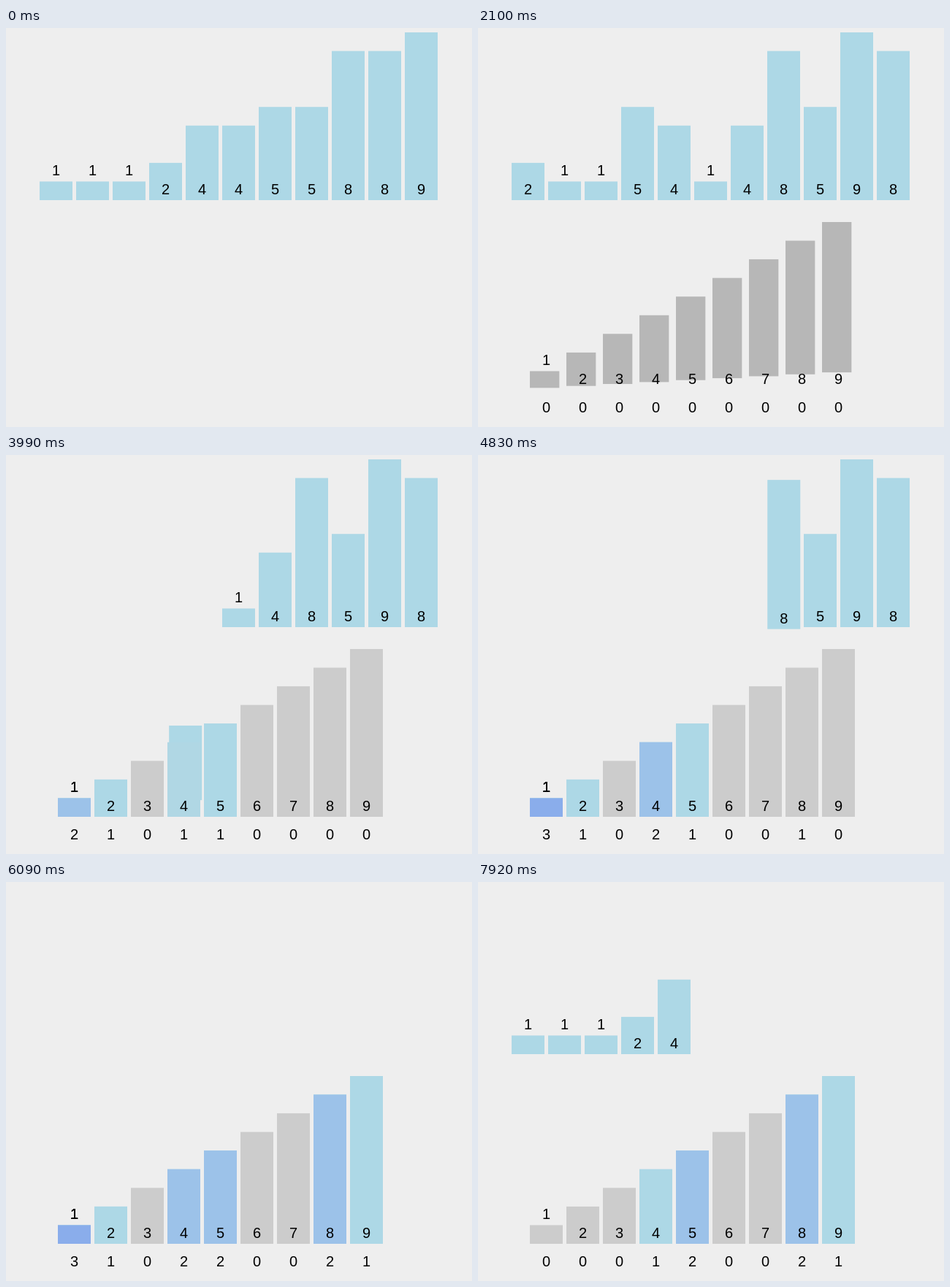
These frames come from a looping animation (638 px wide and 547 px high, 8 s). An HTML page with a canvas:

```html
<!DOCTYPE html>
<html lang="en">
<head>
<meta charset="utf-8">
<title>Counting sort</title>
<style>
  html, body { margin: 0; width: 100%; height: 100%; overflow: hidden; background: #eee; }
  canvas { display: block; }
</style>
</head>
<body>
<canvas id="stage" width="638" height="547"></canvas>
<script>
const ctx = document.getElementById('stage').getContext('2d');
const LOOP = 8000, MOVE = 250, SHUFFLE = 930, REVEAL = 1924;
const UNIT = 230 / 9, WIDTH = 45, PITCH = 50;
const GRAY = [204, 204, 204], LIGHT = [173, 216, 230], BLUE = [0, 0, 255];

const values = [2, 1, 1, 5, 4, 1, 4, 8, 5, 9, 8];
const collectAt = [2400, 2850, 2860, 3360, 3810, 4290, 4370, 4796, 5250, 5760, 5840];
const returnAt = [6210, 6690, 7170, 7425, 7665];

const mix = (a, b, p) => a + (b - a) * p;
const mixColor = (a, b, p) => a.map((c, i) => mix(c, b[i], p));
const rgb = c => `rgb(${c.map(Math.round).join()})`;

// Cubic in-out progress of a move that begins at `start`
function progress(t, start) {
  const p = Math.min(1, Math.max(0, (t - start) / MOVE));
  return p < 0.5 ? 4 * p ** 3 : 1 - 4 * (1 - p) ** 3;
}

const rowSpot = i => ({ x: 46 + PITCH * i, y: 236 });
const binSpot = v => ({ x: 71 + PITCH * (v - 1), y: 496 });

const sortedIds = values.map((v, id) => id).sort((a, b) => values[a] - values[b] || a - b);

// Every bar follows a list of timed destinations
const bars = values.map((value, id) => {
  const rank = sortedIds.indexOf(id);
  const moves = [
    { at: SHUFFLE, to: rowSpot(id) },
    { at: collectAt[id], to: binSpot(value) }
  ];
  if (rank < returnAt.length) moves.push({ at: returnAt[rank], to: rowSpot(rank) });
  return { value, home: rowSpot(rank), moves };
});

// Every bin follows a list of timed count changes
const bins = Array.from({ length: 9 }, (_, i) => {
  const value = i + 1, events = [];
  bars.filter(b => b.value === value).forEach(b =>
    b.moves.slice(1).forEach((m, k) => events.push({ at: m.at, step: k ? -1 : 1 })));
  return { value, events: events.sort((a, b) => a.at - b.at) };
});

const countColor = n => n ? mixColor(LIGHT, BLUE, (n - 1) / 10) : GRAY;

function drawBar(value, { x, y }, color, scale = 1) {
  const height = value * UNIT;
  ctx.fillStyle = rgb(color);
  ctx.fillRect(x, y - height, WIDTH * scale, height * scale);
  drawLabel(value, x, value === 1 ? y - 34 : y - 8);
}

function drawLabel(text, x, y) {
  ctx.fillStyle = '#000';
  ctx.fillText(text, x + WIDTH / 2, y);
}

function drawMover(bar, t) {
  let spot = bar.home;
  for (const { at, to } of bar.moves) {
    const p = progress(t, at);
    spot = { x: mix(spot.x, to.x, p), y: mix(spot.y, to.y, p) };
  }
  drawBar(bar.value, spot, LIGHT);
}

function drawBin(bin, t) {
  const shown = progress(t, REVEAL), spot = binSpot(bin.value);
  let count = 0, color = mixColor([0, 0, 0], GRAY, shown);
  for (const { at, step } of bin.events) {
    if (t < at) break;
    count += step;
    color = mixColor(color, countColor(count), progress(t, at));
  }
  drawBar(bin.value, spot, color, shown);
  drawLabel(count, spot.x, 527);
}

function draw(now) {
  const t = now % LOOP;
  ctx.fillStyle = '#eee';
  ctx.fillRect(0, 0, 638, 547);
  ctx.font = '20px "Liberation Sans", Arial, sans-serif';
  ctx.textAlign = 'center';
  bars.forEach(bar => drawMover(bar, t));
  if (t >= REVEAL) bins.forEach(bin => drawBin(bin, t));
}

let start;
function tick(now) {
  start ??= now;
  draw(now - start);
  requestAnimationFrame(tick);
}
draw(0);
requestAnimationFrame(tick);
</script>
</body>
</html>
```
